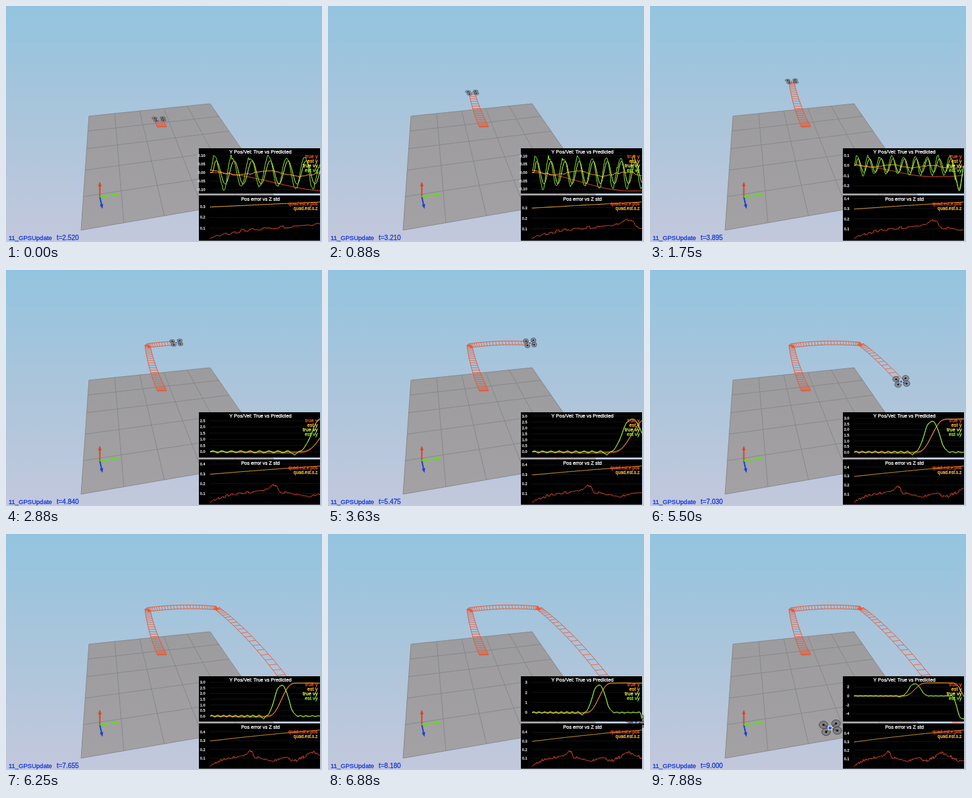
Recreate the animation shown at these times as an HTML page with a canvas. Size 480 by 360 pixels, loop 8 s.

```html
<!DOCTYPE html>
<html lang="en">
<head>
<meta charset="utf-8">
<title>Quadrotor simulation</title>
<style>
html, body { margin: 0; width: 100%; height: 100%; overflow: hidden; }
canvas { display: block; width: 480px; height: 360px; }
</style>
</head>
<body>
<canvas id="stage" width="480" height="360"></canvas>
<script>
const ctx = document.getElementById('stage').getContext('2d');
const LOOP = 8000, STEP = 125, DT = 0.02, TAU = Math.PI * 2;
const RED = '#f0502a', AMBER = '#ffb733', LEMON = '#e6f55a', GREEN = '#84ec28';

const mix = (a, b, u) => a + (b - a) * u;
const smooth = (a, b, v) => {
  const u = Math.min(1, Math.max(0, (v - a) / (b - a)));
  return u * u * (3 - 2 * u);
};
const noise = n => {
  const v = Math.sin(n * 127.1 + 11.7) * 43758.5453;
  return (v - Math.floor(v)) * 2 - 1;
};
// Linear interpolation between [key, value] points
function along(points, k) {
  const n = Math.max(1, points.findIndex(p => p[0] >= k));
  const [a, b] = [points[n - 1], points[n]];
  return mix(a[1], b[1], (k - a[0]) / (b[0] - a[0]));
}

// Simulated seconds for each displayed step
const clock = [[0, 2.52], [14, 3.895], [23, 4.84], [35, 6.105], [44, 7.03], [55, 8.18], [63, 9]];

// Screen path: every leg eases between two points, bowed sideways by `bend`;
// `rung` is the half-vector of the ladder steps at both ends
const legs = [
  { t: [2.1, 3.75], x: [237, 215], y: [184, 115], bend: [-2.5, 0], size: [.65, .6], flat: [.5, .55], rung: [[7, -.8], [4, .2]] },
  { t: [4, 5.9], x: [215, 320], y: [115, 112.5], bend: [0, -3], size: [.6, .6], flat: [.55, 1.1], rung: [[.8, 2.5], [.8, 2.3]] },
  { t: [6.1, 8.2], x: [320, 468], y: [112.5, 287], bend: [0, -15], size: [.6, 1], flat: [1.1, .8], rung: [[4.3, -1.2], [7.5, -1]] },
  { t: [8.2, 9.2], x: [468, 251], y: [287, 297], bend: [0, 0], size: [1, 1], flat: [.8, 1], rung: [[7, 0], [7, 0]] }
];
function pose(s) {
  const leg = legs.filter(l => l.t[0] <= s).pop() || legs[0];
  const u = smooth(...leg.t, s), bow = 4 * u * (1 - u);
  const pick = k => mix(...leg[k], u);
  return {
    x: pick('x') + leg.bend[0] * bow,
    y: pick('y') + leg.bend[1] * bow,
    size: pick('size'),
    flat: pick('flat'),
    rung: [0, 1].map(k => mix(leg.rung[0][k], leg.rung[1][k], u))
  };
}

// Lateral move out, then the fast return
const cruise = s => 2.7 * Math.exp(-Math.pow(Math.abs(s - 4.97) / .62, 2.6)) - 5.15 * smooth(8.02, 8.8, s);
const dip = s => -.25 * Math.exp(-(((s - 3.74) / .12) ** 2));
const sway = s => smooth(0, .08, s) * (s < 3.6 ? .09 : .04) * Math.cos(TAU * (s - .1) / .412);
const errorPoints = [[0, 0], [.35, .05], [1.2, .1], [2.4, .135], [2.85, .19], [3.05, .12], [4.4, .055], [5, .115], [6, .07], [7.2, .175], [8.5, .075], [9.1, .09]];
const sigma = s => .295 + .0195 * s - .00042 * s * s;

const samples = [];
let travelled = 0;
for (let i = 0; i * DT <= 9.0001; i++) {
  const s = i * DT, tick = Math.floor(s * 10 + 1e-6);
  const grain = noise(tick) * (s < 4 ? .018 : .05) + noise(i) * .006;
  travelled += cruise(s) * DT;
  samples.push({
    s,
    y: travelled - .11 * smooth(0, 2.8, s) + .05 * smooth(3.2, 5, s),
    ey: travelled + .012 * Math.sin(s * 4.5 - 4.5) - .012 * s / 3 + noise(tick) * .004,
    vy: cruise(s) + dip(s) + .75 * sway(s - .04),
    evy: cruise(s) + dip(s) + sway(s) + grain,
    err: Math.max(.003, along(errorPoints, s) + noise(tick + 50) * .015 + noise(i) * .002),
    sz: sigma(s)
  });
}

function path(points, close) {
  ctx.beginPath();
  points.forEach(p => ctx.lineTo(p[0], p[1]));
  if (close) ctx.closePath();
}
function stroke(points, color, width) {
  path(points);
  ctx.strokeStyle = color;
  ctx.lineWidth = width;
  ctx.stroke();
}
function text(str, x, y, size, color, align = 'left') {
  ctx.font = size + 'px "Liberation Sans", Arial, sans-serif';
  ctx.textAlign = align;
  ctx.fillStyle = ctx.strokeStyle = color;
  ctx.lineWidth = .3;
  ctx.fillText(str, x, y);
  ctx.strokeText(str, x, y);
}
function gradient(y0, y1, colors) {
  const g = ctx.createLinearGradient(0, y0, 0, y1);
  colors.forEach((c, i) => g.addColorStop(i / (colors.length - 1), c));
  return g;
}

// Unit square to the ground quadrilateral
const corners = [[126, 168], [310, 149], [408, 291], [114, 342]];
const project = (() => {
  const [a, b, c, d] = corners;
  const dx1 = b[0] - c[0], dx2 = d[0] - c[0], dy1 = b[1] - c[1], dy2 = d[1] - c[1];
  const sx = a[0] - b[0] + c[0] - d[0], sy = a[1] - b[1] + c[1] - d[1];
  const det = dx1 * dy2 - dx2 * dy1;
  const g = (sx * dy2 - dx2 * sy) / det, h = (dx1 * sy - sx * dy1) / det;
  return (u, v) => [0, 1].map(k =>
    ((b[k] - a[k] + g * b[k]) * u + (d[k] - a[k] + h * d[k]) * v + a[k]) / (g * u + h * v + 1));
})();

function drawWorld() {
  ctx.fillStyle = gradient(0, 360, ['#93c4df', '#abc5db', '#c3c8dc']);
  ctx.fillRect(0, 0, 480, 360);
  path(corners, true);
  ctx.fillStyle = gradient(149, 342, ['#9c9b9d', '#a3a1a4']);
  ctx.fill();
  for (let i = 0; i <= 5; i++) {
    stroke([project(i / 5, 0), project(i / 5, 1)], '#858587', .9);
    stroke([project(0, i / 5), project(1, i / 5)], '#858587', .9);
  }
}

function arrow(x, y, color) {
  const ox = 142.5, oy = 291, len = Math.hypot(x - ox, y - oy);
  const ux = (x - ox) / len, uy = (y - oy) / len;
  const bx = x - ux * 7, by = y - uy * 7;
  stroke([[ox, oy], [bx, by]], color, 2);
  path([[x, y], [bx - uy * 2.6, by + ux * 2.6], [bx + uy * 2.6, by - ux * 2.6]], true);
  ctx.fillStyle = color;
  ctx.fill();
}

function drawTrail(now) {
  const left = [], right = [], end = Math.min(now, 8.18);
  for (let s = 2.1; s < end; s += .06) {
    const { x, y, rung: [rx, ry] } = pose(s);
    left.push([x - rx, y - ry]);
    right.push([x + rx, y + ry + 1]);
    stroke([left.at(-1), right.at(-1)], RED, .75);
  }
  stroke(left, RED, .9);
  stroke(right, RED, .9);
}

function drawQuad(now) {
  const { x, y, size, flat } = pose(now);
  const rotors = [[-10, -5], [9, -7], [-6, 6], [11, 4]];
  ctx.save();
  ctx.translate(x, y);
  ctx.scale(size, size * flat);
  rotors.forEach(([rx, ry]) => stroke([[0, 0], [rx, ry]], '#1c1c20', 1.8));
  rotors.forEach(([rx, ry]) => {
    ctx.beginPath();
    ctx.ellipse(rx, ry, 6.6, 5.8, 0, 0, TAU);
    ctx.fillStyle = 'rgba(112,112,116,.65)';
    ctx.fill();
    ctx.strokeStyle = '#48484c';
    ctx.lineWidth = 1;
    ctx.stroke();
    ctx.fillStyle = '#111114';
    ctx.fillRect(rx - 1.5, ry - 1.5, 3, 3);
  });
  ctx.fillStyle = '#dfe6f2';
  ctx.fillRect(-3.6, -3.4, 7.2, 6.8);
  ctx.fillStyle = '#3c62c8';
  ctx.fillRect(-2.3, -2.2, 4.6, 4.4);
  ctx.restore();
}

function tickStep(range) {
  for (let e = -3; ; e++)
    for (const m of [1, 2, 5]) {
      const step = m * 10 ** e;
      if (range / step <= 7) return step;
    }
}

function drawPlot(box, rows, now, series) {
  const { top, title, lo, hi, y0, y1, step } = box;
  const toY = v => mix(y0, y1, (v - lo) / (hi - lo));
  ctx.fillStyle = '#000';
  ctx.fillRect(293, top, 184, 69);
  const digits = Math.max(0, -Math.floor(Math.log10(step) + 1e-9));
  for (let k = Math.ceil(lo / step + box.skip); k * step <= hi * 1.1; k++) {
    const y = toY(k * step);
    stroke([[309, y], [477, y]], '#1d1d1d', .7);
    text((k * step).toFixed(digits), 302.5, y + 2, 5.6, '#e4e4e4', 'right');
  }
  series.forEach(([key, color]) =>
    stroke(rows.map(r => [310 + 167 * r.s / now, toY(r[key])]), color, 1));
  text(title, 386.5, top + 7.5, 7.45, '#fff', 'center');
  series.forEach(([, color, label], i) =>
    text(label, 473.5, top + 14.6 + i * 7.1, box.font, color, 'right'));
}

function draw(ms) {
  const step = Math.floor(ms % LOOP / STEP);
  const now = Math.round(along(clock, step) * 200) / 200;
  const rows = samples.filter(r => r.s <= now + 1e-6);
  ctx.lineJoin = 'round';
  drawWorld();
  arrow(142.5, 268, '#e0401e');
  arrow(146.5, 309.5, '#1740d2');
  arrow(171.5, 287, '#5fe012');
  drawTrail(now);
  drawQuad(now);

  const values = rows.flatMap(r => [r.y, r.ey, r.vy, r.evy]);
  const lo = Math.min(...values), hi = Math.max(...values);
  drawPlot({
    top: 217, title: 'Y Pos/Vel: True vs Predicted', lo, hi, y0: 282, y1: 227,
    step: tickStep(hi - lo), skip: 0, font: 7.6
  }, rows, now, [
    ['y', RED, 'true y'], ['ey', AMBER, 'est y'], ['vy', LEMON, 'true vy'], ['evy', GREEN, 'est vy']
  ]);
  drawPlot({
    top: 289, title: 'Pos error vs Z std', lo: 0, hi: sigma(now), y0: 355.5, y1: 299,
    step: .1, skip: 1, font: 6.8
  }, rows, now, [['err', RED, 'quad.est.e.pos'], ['sz', AMBER, 'quad.est.s.z']]);

  text('11_GPSUpdate', 4, 357, 9.5, '#1238dc');
  text('t=' + now.toFixed(3), 77, 357, 10, '#1238dc');
}

let start = null;
function frame(time) {
  if (start === null) start = time;
  draw(Math.max(0, time - start));
  requestAnimationFrame(frame);
}
draw(0);
requestAnimationFrame(frame);
</script>
</body>
</html>
```
